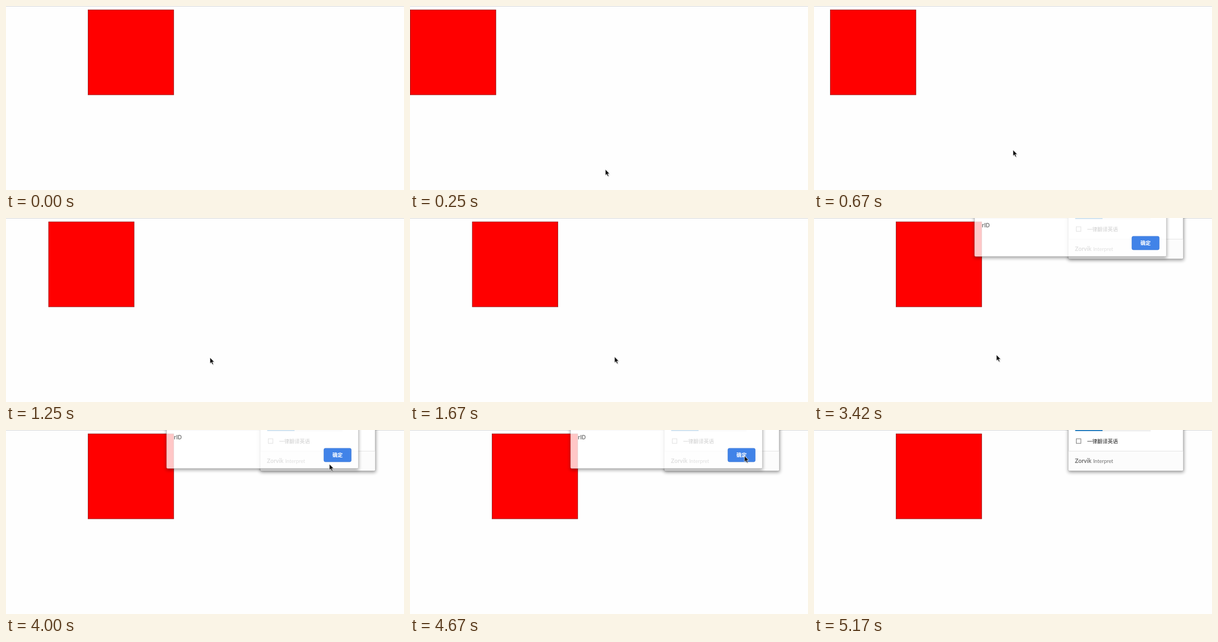
Recreate the animation shown at these times as an HTML page. Size 720 px wide and 335 px high, loop 5.58 s.

```html
<!DOCTYPE html>
<html lang="zh-CN">
<head>
<meta charset="utf-8">
<title>Moving square</title>
<style>
html, body { margin: 0; width: 100%; height: 100%; overflow: hidden; background: #fefefe; }
svg { display: block; width: 720px; height: 335px; }
.cjk { font-family: "Noto Sans CJK SC", "Noto Sans CJK", sans-serif; font-size: 9.3px; }
.brand { font-family: Lato, sans-serif; fill: #707070; }
.label { font: 600 10px Inter, sans-serif; fill: #6f6f6f; }
.soft { filter: blur(3.2px); }
</style>
</head>
<body>
<svg viewBox="0 0 720 335">
  <defs>
    <clipPath id="outside">
      <path clip-rule="evenodd" d="M0 0H720V335H0Z M290.5 -20H637.5V70H290.5Z"/>
    </clipPath>
  </defs>
  <rect width="720" height="1" fill="#d6d8da"/>
  <rect id="square" y="7" width="154.8" height="154.8" fill="#f00" stroke="#8c1616" stroke-width=".8"/>

  <g id="popup">
    <rect class="soft" x="460" y="-20" width="209" height="97" fill="#000" opacity=".4"/>
    <rect x="460" y="-20" width="208" height="94.3" rx="2" fill="#fff" stroke="#a2a2a2" stroke-width=".7"/>
    <path d="M460.5 38.5H667.5V72.5Q667.5 74 666 74H462Q460.5 74 460.5 72.5Z" fill="#fcfcfc"/>
    <path d="M460.5 38.5H667.5" stroke="#e4e4e4"/>
    <path d="M522 1.5H609" stroke="#dcdcdc"/>
    <path d="M472.5 1H522" stroke="#2a7fc0" stroke-width="2"/>
    <rect x="474.5" y="16" width="8.3" height="8.3" fill="#fff" stroke="#777"/>
    <text class="cjk" x="494" y="23.5" fill="#222">一律翻译英语</text>
    <text class="brand" x="472" y="60" font-size="10.5" font-weight="700">Zorvik</text>
    <text class="brand" x="505" y="60" font-size="9.4">Interpret</text>
  </g>

  <g id="dialog">
    <g clip-path="url(#outside)">
      <rect class="soft" x="290" y="-20" width="348" height="93" fill="#000" opacity=".36"/>
    </g>
    <rect x="290.5" y="-20" width="347" height="90" rx="2" fill="#fff" fill-opacity=".78" stroke="#a8a8a8" stroke-opacity=".7" stroke-width=".7"/>
    <text class="label" x="303.8" y="16.8">rID</text>
    <rect x="575" y="33.2" width="49.6" height="24.8" rx="3" fill="#4183e8" stroke="#3b76d2" stroke-width=".6"/>
    <text class="cjk" x="599.8" y="48.8" text-anchor="middle" font-weight="700" fill="#fff">确定</text>
  </g>

  <g id="cursor">
    <path d="M1 1.5V12.5L3.5 10.2L5.4 14.2L7.2 13.4L5.4 9.5H8.8Z" fill="#000" opacity=".16"/>
    <path d="M0 0V11L2.5 8.8L4.3 12.8L6.2 12L4.5 8.1H7.8Z" fill="#111" stroke="#fff" stroke-width=".7"/>
  </g>
</svg>
<script>
const LOOP = 5580, FPS = 12;
const [square, popup, dialog, cursor] =
  ["square", "popup", "dialog", "cursor"].map(id => document.getElementById(id));

// Keys are [step, ...values]; values are blended linearly between steps.
const cursorKeys = [
  [2, 352, 304], [5, 356, 284], [8, 360, 262], [9, 360, 262],
  [15, 369, 254], [16, 370, 252.5], [35, 370, 252.5],
  [41, 330, 249], [42, 330, 249], [45, 420, 180], [48, 585, 62],
  [49, 602, 46], [51, 610, 47], [52, 605, 47], [60, 605, 47], [61, 597, 40]
];
const dialogKeys = [[35, 0], [37, 1], [56, 1], [59, 0]];

function blend(keys, n) {
  if (n <= keys[0][0]) return keys[0].slice(1);
  for (let i = 1; i < keys.length; i++) {
    const a = keys[i - 1], b = keys[i];
    if (n <= b[0]) {
      const p = (n - a[0]) / (b[0] - a[0]);
      return a.slice(1).map((v, j) => v + (b[j + 1] - v) * p);
    }
  }
  return keys[keys.length - 1].slice(1);
}

// Steady travel with a short stall and two small catch-up jumps.
function squareX(n) {
  if (n < 2) return 148.5;
  if (n < 10) return 0.5 + 5.8 * Math.max(0, Math.min(n, 8) - 3);
  if (n < 16) return 47.3 + 5.95 * (n - 10);
  return 89 + 5.95 * (Math.min(n, 26) - 16);
}

function show(el, on) {
  el.style.display = on ? "" : "none";
}

function draw(now) {
  const n = Math.floor((now % LOOP) * FPS / 1000 + 0.05);
  square.setAttribute("x", squareX(n));

  show(popup, n >= 36);
  const [alpha] = blend(dialogKeys, n);
  show(dialog, alpha > 0);
  dialog.setAttribute("opacity", alpha);

  show(cursor, n >= 2 && n < 62);
  const [x, y] = blend(cursorKeys, n);
  cursor.setAttribute("transform", `translate(${x} ${y})`);
}

const start = performance.now();
function tick() {
  draw(performance.now() - start);
  requestAnimationFrame(tick);
}
tick();
</script>
</body>
</html>
```
